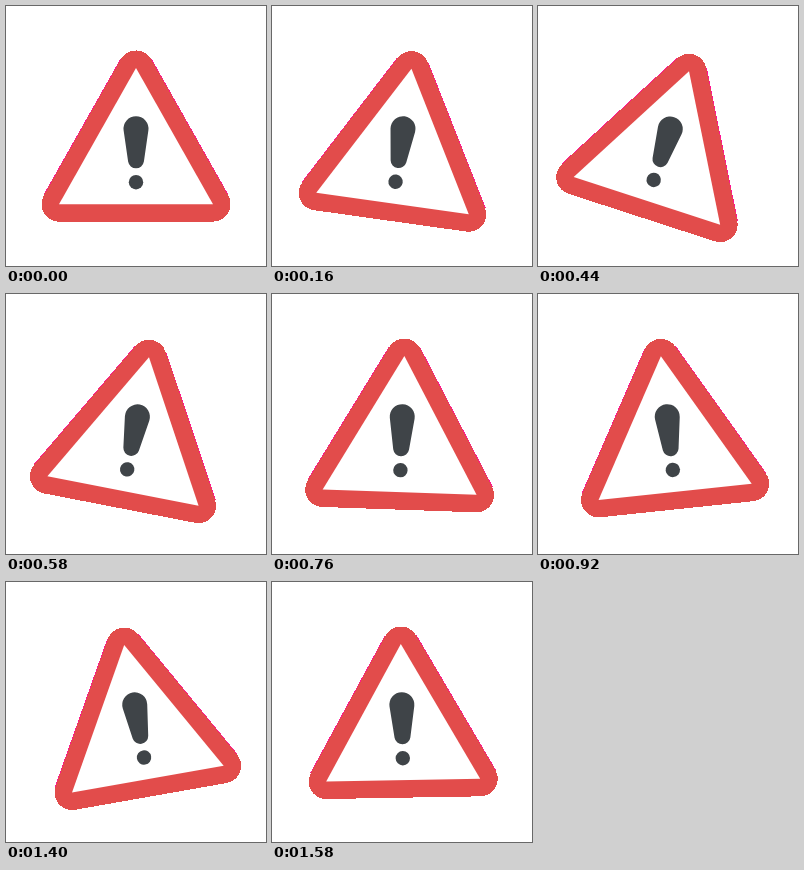
Write an HTML page that moves like this. It is 260 by 260 pixels and loops after 1600 ms.

```html
<!DOCTYPE html>
<html lang="en">
<head>
<meta charset="utf-8">
<title>Swinging warning sign</title>
<style>
  html, body { margin: 0; width: 100%; height: 100%; overflow: hidden; background: #fff; }
  svg { display: block; width: 100%; height: 100%; }
</style>
</head>
<body>
<svg viewBox="0 0 260 260">
  <g id="sign">
    <g shape-rendering="crispEdges">
      <path d="M-77 68.2L0-68M0-68L77 68.2" fill="none" stroke="#ff1493" stroke-width="36.2"/>
      <path d="M0-68L77 68.2H-77Z" fill="#e24c4b" stroke="#e24c4b" stroke-width="35" stroke-linejoin="round"/>
    </g>
    <path d="M0-68L77 68.2H-77Z" fill="#fff"/>
    <g fill="#3f4448">
      <path d="M-12.4-5.75A12.5 12.5 0 1 1 12.4-5.75L7.9 25.6A8 8 0 0 1-7.9 25.6Z"/>
      <circle cy="46.2" r="7.2"/>
    </g>
  </g>
</svg>
<script>
  const PERIOD = 1600, STEP = 20, SWING = 20;
  const sign = document.getElementById('sign');
  const start = performance.now();

  // Triangle wave: 0, +SWING, 0, -SWING, 0 at constant speed
  function angleAt(ms) {
    const p = ms / PERIOD;
    const shifted = (p + 0.75) % 1;
    return SWING * (4 * Math.abs(shifted - 0.5) - 1);
  }

  function draw(now) {
    const t = Math.max(0, now - start) % PERIOD;
    const angle = angleAt(Math.floor(t / STEP) * STEP);
    sign.setAttribute('transform', `translate(130 130) rotate(${angle.toFixed(3)})`);
    requestAnimationFrame(draw);
  }

  draw(start);
</script>
</body>
</html>
```
